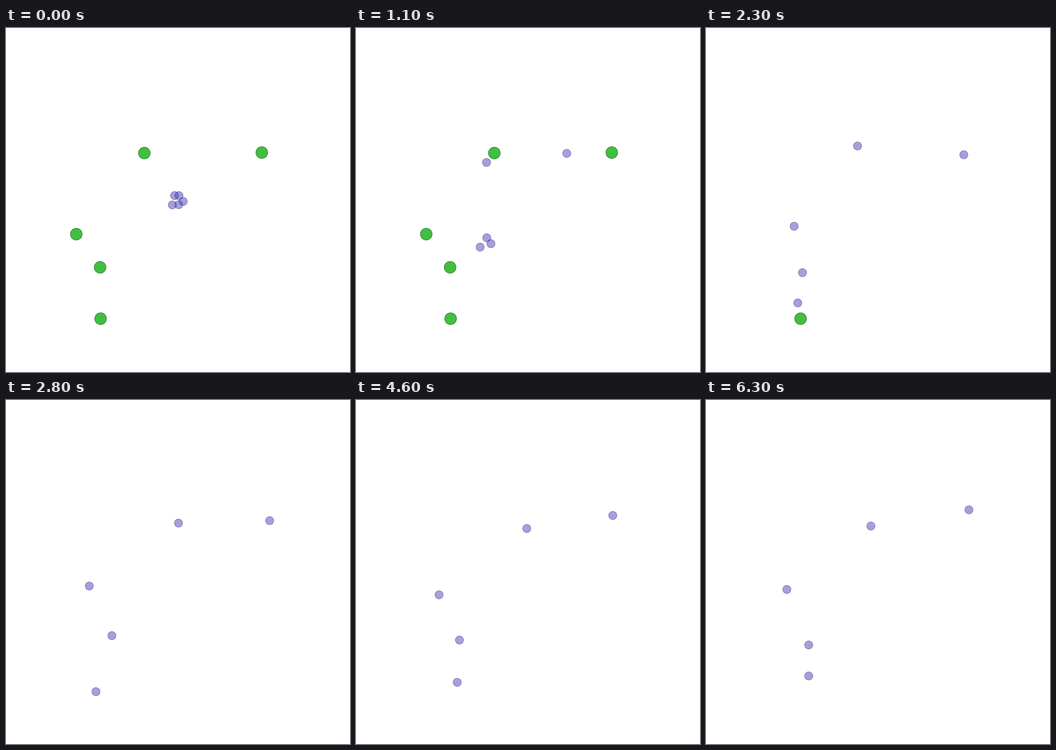
These frames come from a looping animation (700x700 px, 6400 ms). A matplotlib script:

```python
import numpy as np
import matplotlib.pyplot as plt
from matplotlib.animation import FuncAnimation
from matplotlib.patches import Circle

SIZE = 700
FRAMES = 64
LAUNCH = 11                       # steps of straight flight from the centre
TOP_SPEED = 9.71
KEEP = 0.75                       # share of speed kept per step
KEY_TIMES = [18, 28, 36, 46, 63]
SWELL = 0.1                       # sideways drift during the last stretch

AGENT = np.array([0.30, 0.26, 0.74])
GOAL = np.array([0.25, 0.75, 0.25])

# position of each goal and the frame in which it is taken
GOALS = [
    ((281, 254), 19),
    ((520, 253), 19),
    ((142.5, 419), 23),
    ((191, 486.5), 16),
    ((192, 591), 25),
]

# start, heading, positions at the key times
AGENTS = [
    ((342.5, 340.5), (1, -1),
     [(496, 265), (536, 245), (522.5, 230), (522, 234.5), (534.5, 223)]),
    ((351.5, 340.5), (-1, 1),
     [(198, 428), (169, 378), (142, 383), (168.5, 396), (164, 385)]),
    ((351, 359), (-1, -1),
     [(264, 233), (350.5, 250), (338, 222.5), (347, 261), (335, 256)]),
    ((360, 352.5), (-1, 1),
     [(206.5, 505.5), (182.5, 593), (197.5, 558.5), (205.5, 574), (208.5, 561)]),
    ((338, 359.5), (-1, 1),
     [(184.5, 510), (215, 479), (177, 525.5), (210, 488), (208.5, 498)]),
]


def launch_distance(n):
    """Distance per axis after n steps of damped full thrust."""
    return TOP_SPEED * (n - 2.25 * (1 - KEEP ** n))


def hermite(times, points, t):
    """Smooth path through the points, sampled at t."""
    slope = np.gradient(points, times, axis=0)
    i = np.clip(np.searchsorted(times, t, side="right") - 1, 0, len(times) - 2)
    h = (times[i + 1] - times[i])[:, None]
    s = (t - times[i])[:, None] / h
    return ((1 + 2 * s) * (1 - s) ** 2 * points[i]
            + s * (1 - s) ** 2 * h * slope[i]
            + s ** 2 * (3 - 2 * s) * points[i + 1]
            + s ** 2 * (s - 1) * h * slope[i + 1])


def route(start, heading, keys):
    """Positions in every frame: launch, flight past the keys, late swell."""
    n = np.arange(LAUNCH + 1.0)
    launch = np.array(start) + launch_distance(n)[:, None] * np.array(heading)
    t = np.arange(FRAMES, dtype=float)
    path = hermite(np.concatenate([n, KEY_TIMES]), np.vstack([launch, keys]), t)
    begin, end = KEY_TIMES[-2:]
    phase = np.clip((t - begin) / (end - begin), 0, 1)
    path[:, 0] += SWELL * (path[:, 0] - SIZE / 2) * np.sin(np.pi * phase) ** 2
    return path


fig = plt.figure(figsize=(7, 7), dpi=100, facecolor="white")
ax = fig.add_axes([0, 0, 1, 1])
ax.set(xlim=(-0.5, SIZE - 0.5), ylim=(SIZE - 0.5, -0.5))
ax.axis("off")


def disc(center, radius, color, fill_alpha, edge_alpha):
    return ax.add_patch(Circle(center, radius, lw=0.75,
                               fc=(*color, fill_alpha),
                               ec=(*color / 2, edge_alpha)))


routes = [route(*agent) for agent in AGENTS]
goals = [disc(center, 12, GOAL, 1, 0.8) for center, _ in GOALS]
agents = [disc(path[0], 8.3, AGENT, 0.5, 0.5) for path in routes]


def update(frame):
    for agent, path in zip(agents, routes):
        agent.center = path[frame]
    for goal, (_, taken) in zip(goals, GOALS):
        goal.set_visible(frame < taken)
    return goals + agents


anim = FuncAnimation(fig, update, frames=FRAMES, interval=100,
                     repeat=True, repeat_delay=0)
plt.show()
```
